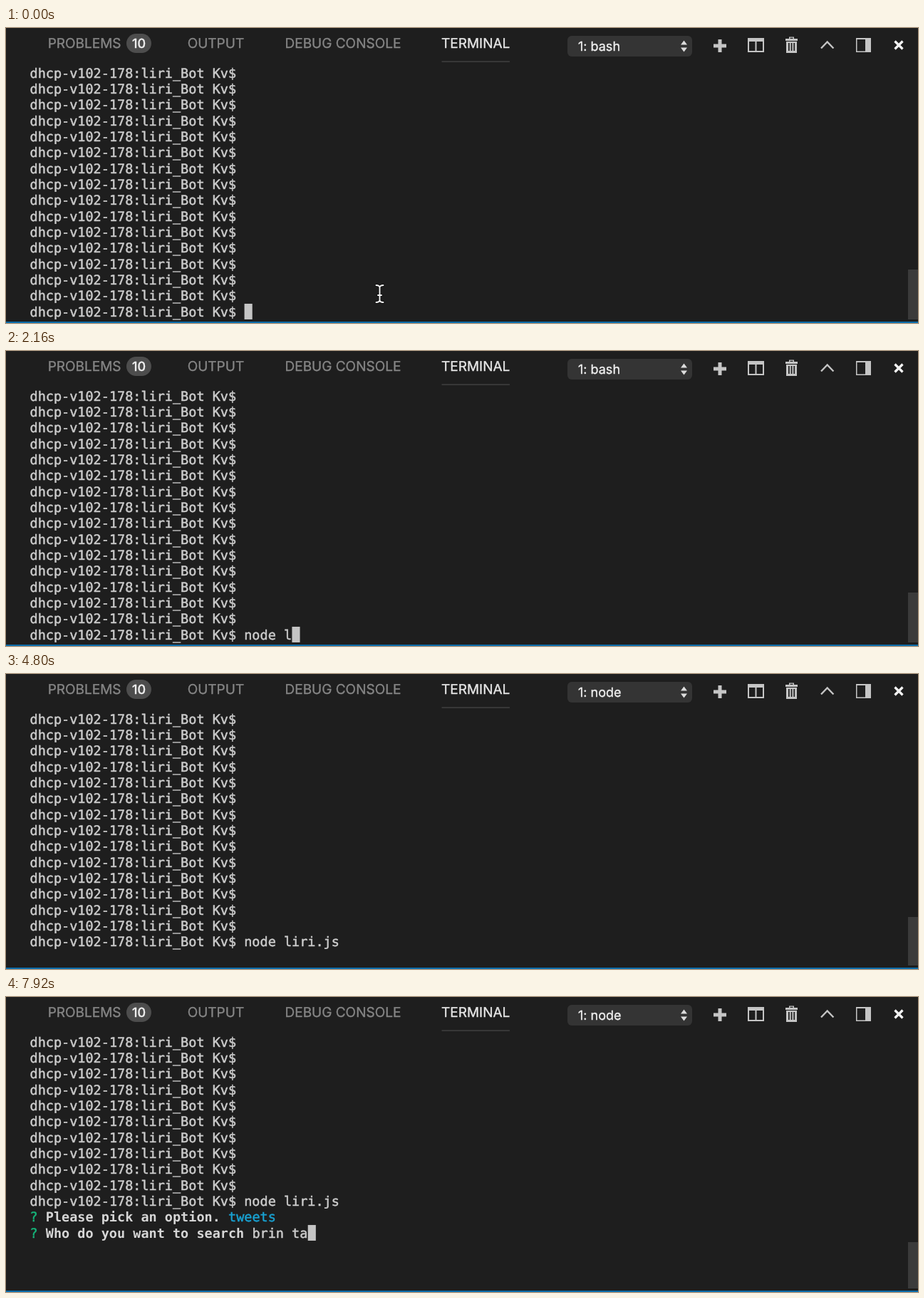
Animation, 1280 px wide and 414 px high, one loop 8 s. Source, as an HTML page:

```html
<!DOCTYPE html>
<html lang="en">
<head>
<meta charset="utf-8">
<title>Terminal session</title>
<style>
html, body { margin: 0; width: 100%; height: 100%; overflow: hidden; background: #1e1e1e; }
svg { display: block; width: 1280px; height: 414px; }
text { white-space: pre; text-rendering: geometricPrecision; }
.ui { font-family: Inter, "Open Sans", sans-serif; font-size: 19px; fill: #868686; }
.ui text { stroke: #868686; stroke-width: 0.35px; }
.ui .on { fill: #e7e7e7; stroke: #e7e7e7; }
.ui .small { font-size: 18px; fill: #f0f0f0; stroke: #f0f0f0; }
#rows { font: 18.5px "DejaVu Sans Mono", "Liberation Mono", monospace; fill: #cccccc; stroke: #cccccc; stroke-width: 0.5px; }
#rows .bold { font-weight: bold; fill: #d6d6d6; stroke: none; }
#rows .green { fill: #16b57a; stroke: #16b57a; }
#rows .cyan { fill: #18a0d0; stroke: #18a0d0; }
#rows .dim { fill: #666666; stroke: #666666; }
</style>
</head>
<body>
<svg viewBox="0 0 1280 414">
  <rect width="1280" height="414" fill="#1e1e1e"/>
  <g class="ui">
    <text x="58.700" y="28">PROBLEMS</text>
    <rect x="169" y="8" width="35" height="27" rx="13.5" fill="#4d4d4d"/>
    <text class="small" x="186.5" y="28.300" text-anchor="middle" font-weight="500">10</text>
    <text x="254.700" y="28">OUTPUT</text>
    <text x="391.500" y="28">DEBUG CONSOLE</text>
    <text class="on" x="611" y="28">TERMINAL</text>
    <rect x="611.500" y="46.500" width="95.500" height="1.300" fill="#444"/>
    <rect x="788" y="11" width="175" height="29" rx="6" fill="#343434"/>
    <text class="small" id="shell" x="803" y="32"></text>
    <path d="M947 23.5l4.5-6 4.5 6zM947 27.5l4.5 6 4.5-6z" fill="#ddd"/>
  </g>
  <g fill="#c5c5c5">
    <path d="M999.5 16h5v6.5h6.5v5h-6.5v6.5h-5v-6.5h-6.5v-5h6.5z"/>
    <path fill-rule="evenodd" d="M1041 14h23v20h-23zM1043 19v13h8.500v-13zM1053.500 19v13h8.500v-13z"/>
    <path fill-rule="evenodd" d="M1094 15h5v-2.500h7v2.500h5v3h-17zM1100.500 15h4v-1.300h-4zM1095 19h15v16h-15zM1098 21v11h1.700v-11zM1101.700 21v11h1.700v-11zM1105.400 21v11h1.700v-11z"/>
    <path fill-rule="evenodd" d="M1193 14h21v20h-21zM1194.500 16v16.500h11.500v-16.500z"/>
  </g>
  <path d="M1144 28.500l8.700-9 8.700 9" fill="none" stroke="#c5c5c5" stroke-width="2.400"/>
  <path d="M1247.500 18.500l11 11m0-11l-11 11" stroke="#f2f2f2" stroke-width="3.300"/>
  <rect id="scroll" x="1266" width="14" fill="#3b3b3b"/>
  <rect y="412" width="1280" height="2" fill="#0c6ba8"/>
  <g id="rows"></g>
  <rect id="caret" width="11.140" height="22" fill="#c5c5c5"/>
  <g id="pointer" fill="none" stroke-linecap="round">
    <path id="outline" stroke="#111" stroke-width="4"/>
    <path id="beam" stroke="#f4f4f4" stroke-width="1.900"/>
  </g>
</svg>
<script>
const LOOP = 8000, LEFT = 33.5, TOP = 52, CHAR = 11.14, LINE = 22.33;
const PROMPT = "dhcp-v102-178:liri_Bot Kv$ ";
const COMMAND = "node liri.js", ANSWER = "brin ta";
const COMMAND_KEYS = [840, 1080, 1440, 1620, 1860, 2100, 2340, 2580, 2760, 3420, 3720, 3900];
const ANSWER_KEYS = [6840, 7200, 7320, 7440, 7620, 7740, 7920];
const ENTER = 4080, RENAME = 4380, READY = 4800, MENU = 4860, CHOSEN = 5880;
const BEAM = "M519.5 361q4.5 0 5 3q.5-3 5-3M524.5 364v18M519.5 385q4.5 0 5-3q.5 3 5 3M522 375h5";

const el = id => document.getElementById(id);
const typed = (text, keys, t) => text.slice(0, keys.filter(k => k <= t).length);
const run = (col, text, style = "") => ({ col, text, style });
const prompts = n => Array.from({ length: n }, () => [run(0, PROMPT)]);

function screenAt(t) {
  const command = [run(0, PROMPT + typed(COMMAND, COMMAND_KEYS, t))];
  if (t < ENTER) {
    return { rows: [...prompts(15), command], caret: [command[0].text.length, 15], bar: 339 };
  }
  if (t < MENU) {
    return { rows: [...prompts(14), command], caret: t < READY ? [0, 15] : null, bar: 341 };
  }
  const question = text => [run(0, "?", "green"), run(2, text, "bold")];
  const pick = question("Please pick an option.");
  const rows = [...prompts(10), command, pick];
  if (t < CHOSEN) {
    pick.push(run(25, "(Use arrow keys)", "dim"));
    rows.push([run(0, "❯", "cyan"), run(2, "tweets", "cyan")]);
    for (const option of ["music", "movies", "log"]) rows.push([run(2, option)]);
    return { rows, caret: null, bar: 344 };
  }
  const answer = typed(ANSWER, ANSWER_KEYS, t);
  pick.push(run(25, "tweets", "cyan"));
  rows.push([...question("Who do you want to search"), run(28, answer)]);
  return { rows, caret: [28 + answer.length, 12], bar: 344 };
}

let shown = "";
function draw(t) {
  const { rows, caret, bar } = screenAt(t);
  const markup = rows.map((runs, i) => runs.map(r =>
    `<text class="${r.style}" x="${LEFT + r.col * CHAR}" y="${TOP + 17.6 + i * LINE}">${r.text}</text>`
  ).join("")).join("");
  if (markup !== shown) el("rows").innerHTML = shown = markup;

  el("caret").style.display = caret ? "" : "none";
  if (caret) {
    el("caret").setAttribute("x", LEFT + caret[0] * CHAR + 0.3);
    el("caret").setAttribute("y", TOP + caret[1] * LINE);
  }
  el("scroll").setAttribute("y", bar);
  el("scroll").setAttribute("height", 409 - bar);
  el("shell").textContent = t < RENAME ? "1: bash" : "1: node";
  el("pointer").style.display = t < COMMAND_KEYS[0] ? "" : "none";
}

for (const id of ["outline", "beam"]) el(id).setAttribute("d", BEAM);
const start = performance.now();
function tick() {
  draw((performance.now() - start) % LOOP);
  requestAnimationFrame(tick);
}
tick();
</script>
</body>
</html>
```
